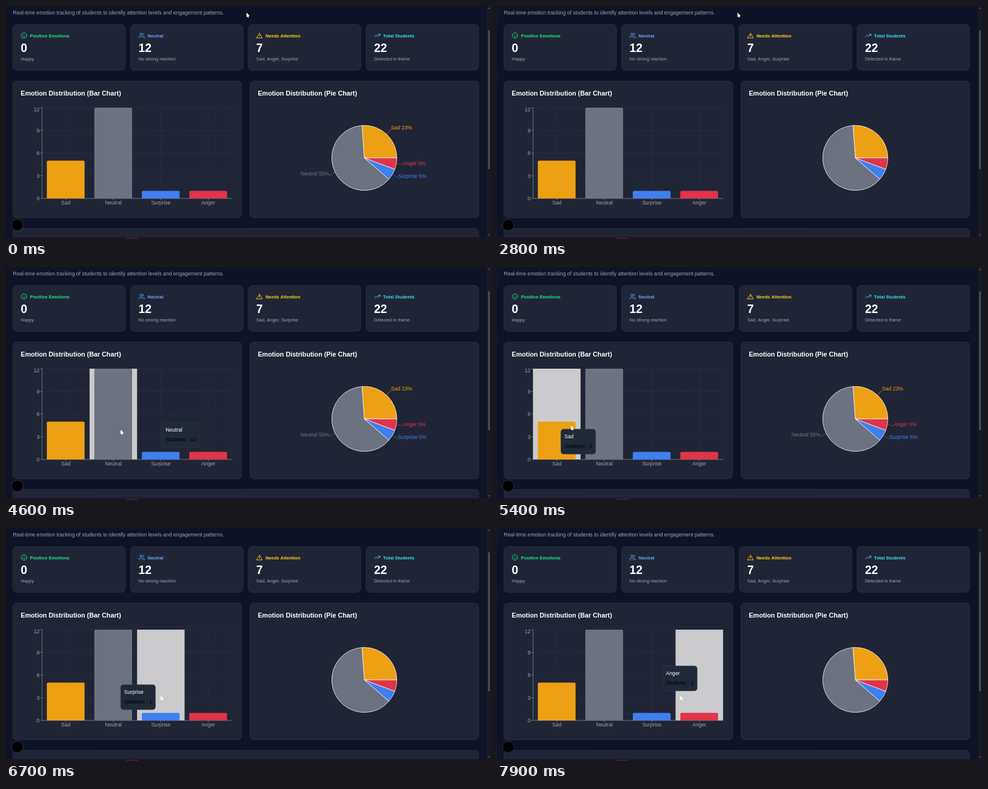
Recreate the animation shown at these times as an HTML page with a canvas. Size 800x385 px, loop 8 s.

```html
<!DOCTYPE html>
<html lang="en">
<head>
<meta charset="utf-8">
<title>Emotion dashboard</title>
<style>
html, body { margin: 0; width: 100%; height: 100%; overflow: hidden; background: #0e1325; }
canvas { display: block; width: 800px; height: 385px; }
</style>
</head>
<body>
<canvas id="stage"></canvas>
<script>
const canvas = document.getElementById('stage');
const ctx = canvas.getContext('2d');
const dpr = window.devicePixelRatio || 1;
canvas.width = 800 * dpr;
canvas.height = 385 * dpr;

const LOOP = 8000, STEP = 100, TAU = Math.PI * 2;
const ZOOM = 0.538; // the page is shown at this scale
const FONT = '"Liberation Sans", Arial, sans-serif';
const SMALL = 14 * ZOOM, BASE = 16 * ZOOM, HEAD = 20 * ZOOM, HUGE = 36 * ZOOM;
const GRAY = '#9ca3af', WHITE = '#ffffff', GRID = '#374151', PANEL = '#202536', EDGE = '#2d3447';

const series = [
  { name: 'Sad', count: 5, share: 23, color: '#eda013' },
  { name: 'Neutral', count: 12, share: 55, color: '#6c727f' },
  { name: 'Surprise', count: 1, share: 5, color: '#407fee' },
  { name: 'Anger', count: 1, share: 5, color: '#e0344a' }
];
const cards = [
  { title: 'Positive Emotions', value: 0, note: 'Happy', color: '#1bec80', icon: smile },
  { title: 'Neutral', value: 12, note: 'No strong reaction', color: '#60abff', icon: people },
  { title: 'Needs Attention', value: 7, note: 'Sad, Anger, Surprise', color: '#ffd01a', icon: warning },
  { title: 'Total Students', value: 22, note: 'Detected in frame', color: '#38e2ee', icon: trend }
];
const plot = { x: 59.5, y: 168, w: 313.4, h: 150, unit: 12.5 };
const right = plot.x + plot.w, bottom = plot.y + plot.h;
const band = plot.w / series.length;

// The pointer rests at each stop and reaches the next by a quick move
const MOVE = 160;
const stops = [
  { at: 0, x: 396.7, y: 11 },
  { at: 3350, x: 322, y: 170 },
  { at: 3660, x: 357.5, y: 310 },
  { at: 4520, x: 189, y: 269 },
  { at: 4980, x: 85, y: 259 },
  { at: 5350, x: 122, y: 262 },
  { at: 5900, x: 155, y: 265 },
  { at: 6680, x: 255, y: 277 },
  { at: 7900, x: 302, y: 277 }
];

function pointerAt(t) {
  let { x, y } = stops[0];
  for (const s of stops.slice(1)) {
    const k = Math.min(1, Math.max(0, 1 - (s.at - t) / MOVE));
    const e = k * k * (3 - 2 * k);
    x += (s.x - x) * e;
    y += (s.y - y) * e;
  }
  return { x, y };
}

function bandAt({ x, y }) {
  const inside = x >= plot.x && x < right && y >= plot.y && y <= bottom;
  return inside ? Math.floor((x - plot.x) / band) : -1;
}

const tipLabel = s => `Students : ${s.count}`;
const TIP = { h: 41, pad: 5.6, gap: 8 };

function tipWidth(s) {
  ctx.font = `${BASE}px ${FONT}`;
  return ctx.measureText(tipLabel(s)).width + TIP.pad * 2;
}

// Right of and below the pointer, flipped where the plot ends
function tipTarget(p, s) {
  const place = (v, size, limit) => v + TIP.gap + size > limit ? v - TIP.gap - size : v + TIP.gap;
  return { x: place(p.x, tipWidth(s), right), y: place(p.y, TIP.h, bottom) };
}

// The tooltip trails behind: mean of its recent targets
function tipAt(t) {
  let x = 0, y = 0, n = 0;
  for (let back = 0; back < 400; back += 10) {
    const p = pointerAt(t - back), i = bandAt(p);
    if (i < 0) continue;
    const goal = tipTarget(p, series[i]);
    x += goal.x;
    y += goal.y;
    n++;
  }
  return { x: x / n, y: y / n };
}

function text(str, x, y, size, color, align = 'left', weight = 'normal') {
  ctx.font = `${weight} ${size}px ${FONT}`;
  ctx.textAlign = align;
  ctx.fillStyle = color;
  ctx.fillText(str, x, y);
}

function rect(x, y, w, h, color) {
  ctx.fillStyle = color;
  ctx.fillRect(x, y, w, h);
}

function box(x, y, w, h, r, fill, stroke) {
  ctx.beginPath();
  ctx.roundRect(x, y, w, h, r);
  ctx.fillStyle = fill;
  ctx.fill();
  if (stroke) {
    ctx.strokeStyle = stroke;
    ctx.lineWidth = 0.8;
    ctx.stroke();
  }
}

function line(x0, y0, x1, y1, color, width = 0.6) {
  ctx.beginPath();
  ctx.moveTo(x0, y0);
  ctx.lineTo(x1, y1);
  ctx.strokeStyle = color;
  ctx.lineWidth = width;
  ctx.stroke();
}

// Icons live on a 24-unit grid
function arc(x, y, r, from = 0, to = TAU, join = false) {
  if (!join) ctx.moveTo(x + r * Math.cos(from), y + r * Math.sin(from));
  ctx.arc(x, y, r, from, to);
}

function dot(x, y) {
  ctx.moveTo(x, y);
  ctx.lineTo(x + 0.01, y);
}

function smile() {
  arc(12, 12, 10);
  arc(12, 11, 5, TAU * 0.1, TAU * 0.4);
  dot(9, 9);
  dot(15, 9);
}

function people() {
  arc(9, 7, 4);
  ctx.moveTo(2, 21);
  arc(6, 19, 4, TAU / 2, TAU * 0.75, true);
  arc(12, 19, 4, TAU * 0.75, TAU, true);
  ctx.lineTo(16, 21);
  arc(15, 7, 4, -1.3, 1.3);
  arc(18, 19, 4, -1.3, 0);
  ctx.lineTo(22, 21);
}

function warning() {
  for (let i = 0; i < 3; i++) {
    const a = TAU * (i / 3 - 0.25);
    ctx.lineTo(12 + 12 * Math.cos(a), 15 + 12 * Math.sin(a));
  }
  ctx.closePath();
  ctx.moveTo(12, 9);
  ctx.lineTo(12, 13);
  dot(12, 17);
}

function trend() {
  ctx.moveTo(2, 17);
  ctx.lineTo(8.5, 10.5);
  ctx.lineTo(13.5, 15.5);
  ctx.lineTo(22, 7);
  ctx.moveTo(16, 7);
  ctx.lineTo(22, 7);
  ctx.lineTo(22, 13);
}

function drawCard(card, i) {
  const x = 11.3 + i * 194.2, inner = x + 13;
  box(x, 30.6, 185.6, 75.6, 6.5, PANEL, EDGE);
  ctx.save();
  ctx.translate(inner, 43.4);
  ctx.scale(20 / 24 * ZOOM, 20 / 24 * ZOOM);
  ctx.strokeStyle = card.color;
  ctx.lineWidth = 2;
  ctx.lineCap = ctx.lineJoin = 'round';
  ctx.beginPath();
  card.icon();
  ctx.stroke();
  ctx.restore();
  text(card.title, x + 28.2, 51.5, SMALL, card.color, 'left', 'bold');
  text(card.value, inner, 76.3, HUGE, WHITE, 'left', 'bold');
  text(card.note, inner, 90.2, SMALL, GRAY);
}

function drawPanel(x, title) {
  box(x, 124, 377.5, 226, 6.5, PANEL, EDGE);
  text(title, x + 13, 148.2, HEAD, WHITE, 'left', 'bold');
}

function drawBars(active) {
  const center = i => plot.x + band * (i + 0.5);
  const level = v => bottom - v * plot.unit;
  ctx.setLineDash([1.6, 1.6]);
  for (let v = 3; v <= 12; v += 3) line(plot.x, level(v), right, level(v), GRID);
  series.forEach((s, i) => line(center(i), plot.y, center(i), bottom, GRID));
  line(right, plot.y, right, bottom, GRID);
  ctx.setLineDash([]);

  if (active >= 0) rect(plot.x + active * band, plot.y, band, plot.h, '#cbcbcd');
  line(plot.x, plot.y, plot.x, bottom, GRAY);
  line(plot.x, bottom, right, bottom, GRAY);
  for (let v = 0; v <= 12; v += 3) {
    line(plot.x - 3.2, level(v), plot.x, level(v), GRAY);
    text(v, plot.x - 4.2, Math.max(level(v), plot.y + 3.3) + 3.1, BASE, GRAY, 'right');
  }
  series.forEach((s, i) => {
    line(center(i), bottom, center(i), bottom + 3.2, GRAY);
    box(center(i) - band * 0.4, level(s.count), 62.3, s.count * plot.unit, [2.1, 2.1, 0, 0], s.color);
    text(s.name, center(i), 328.2, BASE, GRAY, 'center');
  });
}

function drawPie(labels) {
  const cx = 591, cy = 251, r = 53.7, reach = r + 11;
  const total = series.reduce((sum, s) => sum + s.share, 0);
  let from = 0;
  for (const s of series) {
    const to = from - s.share / total * TAU;
    const mid = (from + to) / 2, c = Math.cos(mid), d = Math.sin(mid);
    ctx.beginPath();
    ctx.moveTo(cx, cy);
    ctx.arc(cx, cy, r, from, to, true);
    ctx.closePath();
    ctx.fillStyle = s.color;
    ctx.fill();
    ctx.strokeStyle = WHITE;
    ctx.lineWidth = 0.75;
    ctx.lineJoin = 'round';
    ctx.stroke();
    if (labels) {
      const ex = cx + c * reach, ey = cy + d * reach;
      line(cx + c * r, cy + d * r, ex, ey, s.color);
      text(`${s.name} ${s.share}%`, ex, ey + 0.1, BASE, s.color, c < 0 ? 'right' : 'left');
    }
    from = to;
  }
}

function drawTip(s, { x, y }) {
  box(x, y, tipWidth(s), TIP.h, 4.3, '#1f2937', '#2c3545');
  text(s.name, x + TIP.pad, y + 15.2, BASE, WHITE);
  text(tipLabel(s), x + TIP.pad, y + 30.8, BASE, '#000000');
}

function drawPointer({ x, y }) {
  line(x + 1.8, y + 4.5, x + 3.3, y + 8, WHITE, 1.5);
  ctx.beginPath();
  ctx.moveTo(x, y);
  ctx.lineTo(x, y + 7.2);
  ctx.lineTo(x + 5.1, y + 5.1);
  ctx.closePath();
  ctx.fillStyle = WHITE;
  ctx.fill();
}

function arrow(y, dir) {
  ctx.beginPath();
  ctx.moveTo(794.8, y + dir);
  ctx.lineTo(798.6, y + dir);
  ctx.lineTo(796.7, y - dir);
  ctx.fillStyle = '#55585f';
  ctx.fill();
}

function drawChrome() {
  rect(793, 0, 7, 382, '#171b29');
  box(795.3, 40, 2.8, 230, 1.4, '#4e515b');
  arrow(3.5, 1.3);
  arrow(378.5, -1.3);
  rect(0, 382, 800, 3, '#1d1426');
  rect(198, 383, 20, 2, '#42202f');
}

function draw(t) {
  const pointer = pointerAt(t), active = bandAt(pointer);
  // Data arrives every 5 s; labels stay hidden for the 2 s redraw
  const labels = (t + 3700) % 5000 >= 2000;

  ctx.setTransform(dpr, 0, 0, dpr, 0, 0);
  rect(0, 0, 800, 385, '#0e1325');
  text('Real-time emotion tracking of students to identify attention levels and engagement patterns.', 11.2, 14.1, BASE, GRAY);
  cards.forEach(drawCard);
  drawPanel(11.3, 'Emotion Distribution (Bar Chart)');
  drawPanel(402.4, 'Emotion Distribution (Pie Chart)');
  box(11.3, 367.4, 768.5, 40, 6.5, PANEL, EDGE);
  drawBars(active);
  drawPie(labels);
  if (active >= 0) drawTip(series[active], tipAt(t));
  box(9, 352.4, 19, 19, 9.5, '#000000', '#3a3d47');
  drawChrome();
  drawPointer(pointer);
}

const start = performance.now();
let last = -1;
function tick() {
  const t = Math.floor((performance.now() - start) % LOOP / STEP) * STEP;
  if (t !== last) draw(last = t);
  requestAnimationFrame(tick);
}
tick();
</script>
</body>
</html>
```
